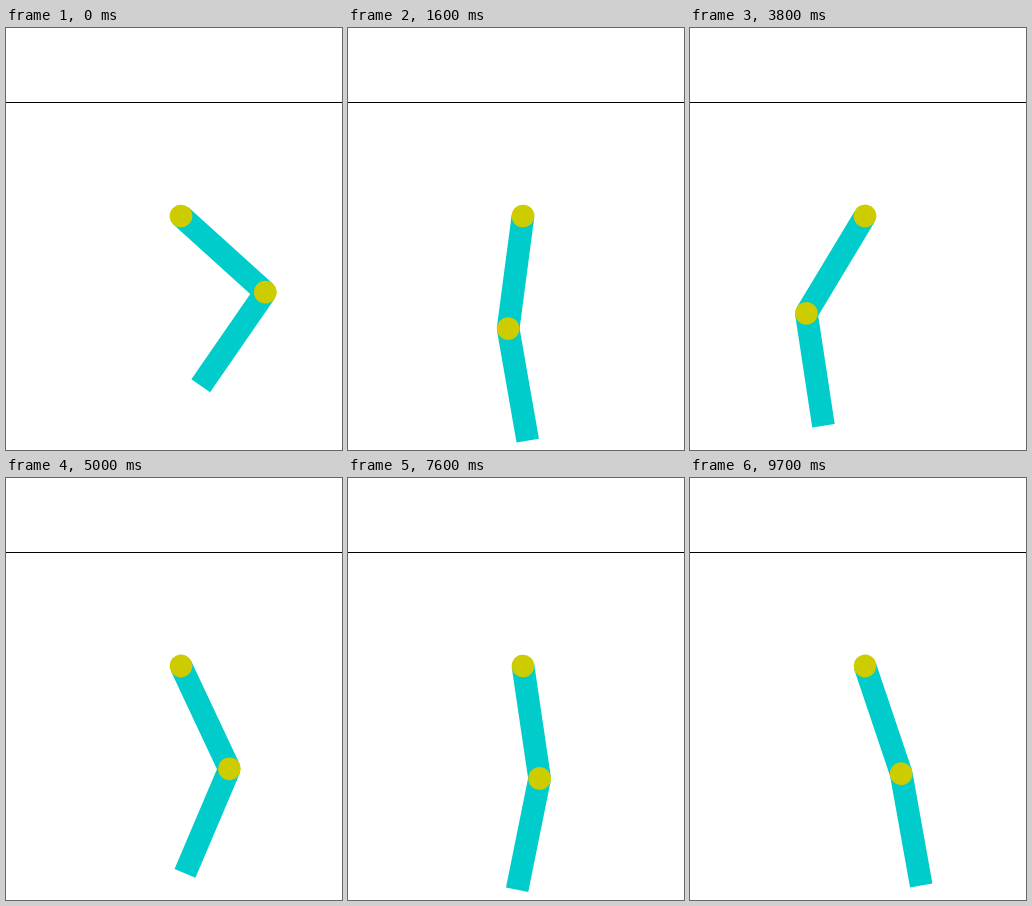
Animation, 336 px wide and 422 px high, one loop 9800 ms. Source, as an HTML page:

```html
<!DOCTYPE html>
<html lang="en">
<head>
<meta charset="utf-8">
<title>Double pendulum</title>
<style>
  html, body { margin: 0; width: 100%; height: 100%; overflow: hidden; background: #fff; }
  svg { display: block; width: 336px; height: 422px; }
  .link { fill: #00cccc; }
  .joint { fill: #cccc00; }
</style>
</head>
<body>
<svg viewBox="0 0 336 422">
  <rect y="74" width="336" height="1"/>
  <g id="upper">
    <rect class="link" x="-11.36" width="22.72" height="113.64"/>
    <circle class="joint" r="11.36"/>
  </g>
  <g id="lower">
    <rect class="link" x="-11.36" width="22.72" height="113.64"/>
    <circle class="joint" r="11.36"/>
  </g>
</svg>
<script>
  const STEP = 100, STEPS = 98;
  const LENGTH = 113.64, PIVOT = { x: 175, y: 188 };

  // The motion is a sum of the pendulum's two swing modes:
  // links against each other, and links together.
  // step, then amplitude in degrees and phase in turns of each mode
  const keys = [
    [0, 52, -0.069, 1.5, -3.173],
    [16, 48, 1.722, 1.5, -1.849],
    [25, 63, 2.806, 2, -0.778],
    [38, 45, 4.355, 5, 0.628],
    [61, 27, 7.277, 6, 2.741],
    [76, 18, 9.162, 4, 4.292],
    [97, 22, 11.852, 14.5, 6.189]
  ];

  function mix(step) {
    const i = Math.max(1, keys.findIndex(k => k[0] >= step));
    const from = keys[i - 1], to = keys[i];
    const f = (step - from[0]) / (to[0] - from[0]);
    return from.map((v, j) => v + (to[j] - v) * f);
  }

  const wave = (amp, turns) => amp * Math.cos(2 * Math.PI * turns);

  function place(id, x, y, angle) {
    document.getElementById(id)
      .setAttribute("transform", `translate(${x} ${y}) rotate(${-angle})`);
  }

  function draw(step) {
    const [, amp1, turns1, amp2, turns2] = mix(step);
    const against = wave(amp1, turns1), together = wave(amp2, turns2);
    const upper = together + against;
    const lower = 3.79 * together - 0.79 * against;
    const rad = upper * Math.PI / 180;
    place("upper", PIVOT.x, PIVOT.y, upper);
    place("lower", PIVOT.x + LENGTH * Math.sin(rad),
      PIVOT.y + LENGTH * Math.cos(rad), lower);
  }

  const start = performance.now();
  function tick() {
    draw(Math.floor((performance.now() - start) / STEP) % STEPS);
    requestAnimationFrame(tick);
  }
  tick();
</script>
</body>
</html>
```
